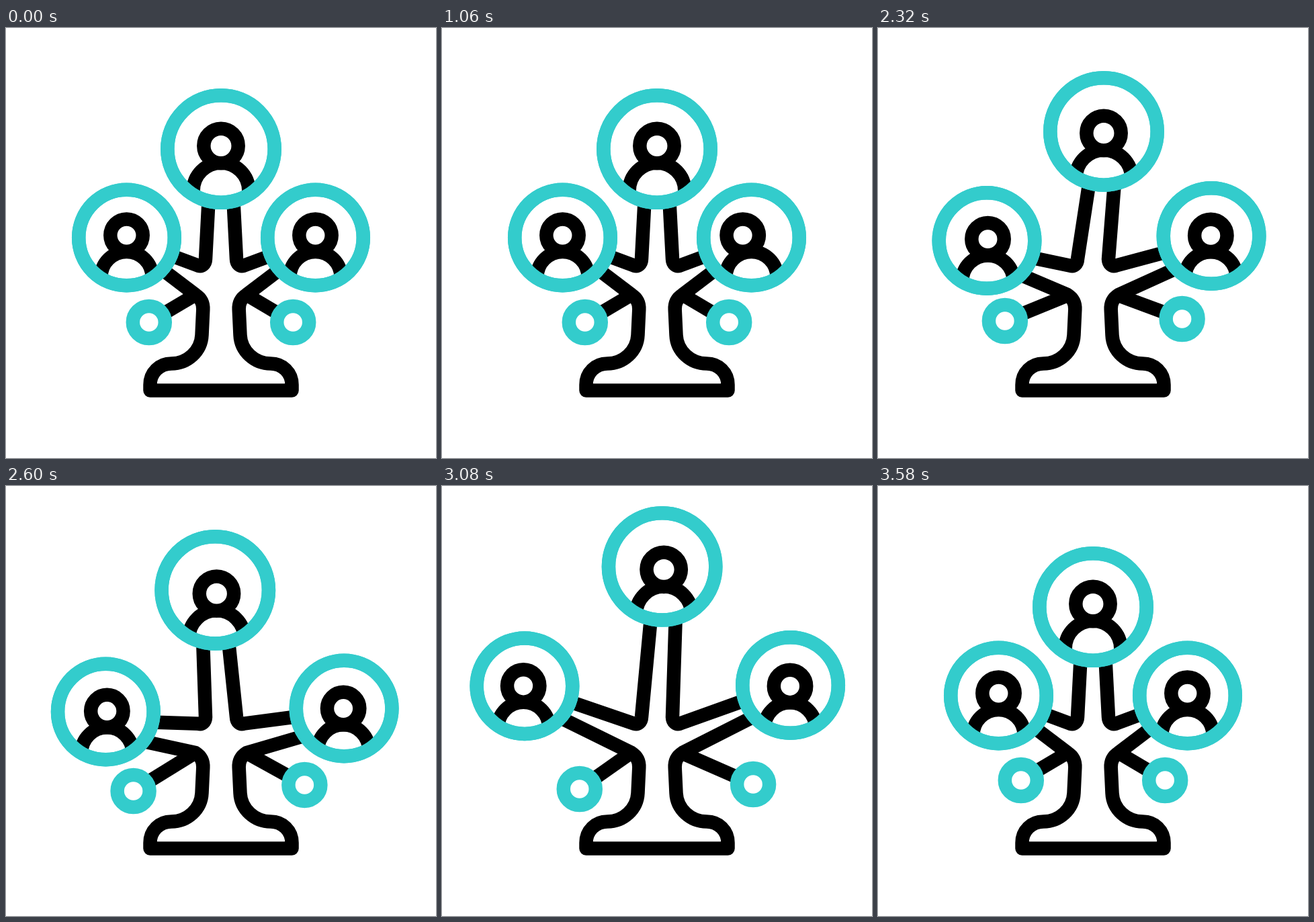
Recreate the animation shown at these times as an HTML page with a canvas. Size 640 px wide and 640 px high, loop 3.6 s.

```html
<!DOCTYPE html>
<html lang="en">
<head>
<meta charset="utf-8">
<title>People tree</title>
<style>
  html, body { margin: 0; width: 100%; height: 100%; overflow: hidden; background: #fff; }
  canvas { display: block; width: 100vw; height: 100vh; }
</style>
</head>
<body>
<canvas width="640" height="640"></canvas>
<script>
const ctx = document.querySelector('canvas').getContext('2d');
const LOOP = 3600, TEAL = '#33cccc', BLACK = '#000', STROKE = 20.5;
const SWAY_START = 1980, SWAY_STEP = 400, NOD_STEP = 660;

// Each track holds four poses: rest, first sway, second sway, third sway.
const top_ = {
  radius: 79.7, headRadius: 25.7, bustRadius: 41.3, bustDrop: 66.5,
  ring: [[320, 180], [337, 152.3], [292.5, 156.8], [334, 113.2]],
  head: [[320, 175.5], [337, 155.3], [296.3, 163.7], [336.3, 117.2]],
  nod: [20, 0]
};
const right = {
  radius: 71.3, headRadius: 24.2, bustRadius: 38.1, bustDrop: 62.4,
  ring: [[460.5, 312], [498.3, 309.3], [506.6, 346.9], [520.7, 287.4]],
  head: [[460.5, 308.6], [497.5, 308.9], [505.5, 347.2], [520.3, 289]],
  nod: [-13, 0]
};
const left = {
  radius: 71.3, headRadius: 24.2, bustRadius: 38.1, bustDrop: 62.4,
  ring: [[179.5, 312], [160.9, 316.8], [139.2, 350], [120, 288.2]],
  head: [[179.5, 308.6], [162.5, 314.5], [141.5, 350], [117.5, 287.9]],
  nod: [0, -7]
};
const people = [top_, right, left];
const buds = [
  { from: [277, 400], ring: [[212.8, 438], [187.4, 435.9], [191.2, 467.3], [207.2, 448]] },
  { from: [363, 400], ring: [[427.2, 438], [454.2, 432.7], [437.2, 453.8], [467.8, 442.2]] }
];
// Where the branches meet the rings, relative to the ring centres.
const joints = {
  topLeft: [-18.6, -22.4, -14.8, -17.5],
  topRight: [18.6, 15.5, 23.8, 19.3],
  leftUpper: [24.4, 23.8, 8.9, 22.9],
  leftLower: [45.2, 51.1, 36.7, 47.3],
  rightUpper: [24.4, 22.1, 2.8, 22.8],
  rightLower: [45.2, 47.7, 31.3, 46.6]
};

const ease = u => { u = Math.min(1, Math.max(0, u)); return u * u * (3 - 2 * u); };
const mix = (a, b, u) => a + (b - a) * u;

function sway(track, t) {
  const phase = Math.min(3.9999, Math.max(0, (t - SWAY_START) / SWAY_STEP));
  const i = Math.floor(phase), u = ease(phase - i);
  const a = track[i], b = track[(i + 1) % 4];
  return Array.isArray(a) ? a.map((v, k) => mix(v, b[k], u)) : mix(a, b, u);
}

const nodAmount = t => ease(t / 220) - ease((t - 380) / 280);

function stroke(color) {
  ctx.strokeStyle = color;
  ctx.stroke();
}

function circle([x, y], r, color) {
  ctx.beginPath();
  ctx.arc(x, y, r, 0, 2 * Math.PI);
  ctx.fillStyle = '#fff';
  ctx.fill();
  stroke(color);
}

// One half of the tree; the right half is drawn mirrored about x = 320.
function crown(side, topEnd, upperEnd, lowerEnd) {
  const m = x => side < 0 ? x : 640 - x;
  ctx.beginPath();
  ctx.moveTo(...topEnd);
  ctx.lineTo(m(297), 344);
  ctx.bezierCurveTo(m(296.7), 351, m(292), 355.7, m(286), 353.7);
  ctx.lineTo(...upperEnd);
  ctx.moveTo(...lowerEnd);
  ctx.lineTo(m(282), 397);
  ctx.bezierCurveTo(m(289), 401.5, m(293.8), 409, m(293.3), 419);
  ctx.lineTo(m(291.5), 457);
  ctx.bezierCurveTo(m(290.4), 481, m(270), 499.5, m(246), 499.5);
  ctx.bezierCurveTo(m(228.5), 499.5, m(214.5), 513, m(214.5), 531);
  ctx.lineTo(m(214.5), 539.5);
  ctx.lineTo(320, 539.5);
  stroke(BLACK);
}

function drawPerson(person, index, t) {
  const ring = sway(person.ring, t), [x, y] = sway(person.head, t);
  const nod = nodAmount(t - index * NOD_STEP);
  const bustY = y + person.bustDrop, r = person.bustRadius;

  circle(ring, person.radius, TEAL);
  ctx.save();
  ctx.beginPath();
  ctx.arc(...ring, person.radius, 0, 2 * Math.PI);
  ctx.clip();
  ctx.beginPath();
  ctx.moveTo(x - r, bustY + 40);
  ctx.arc(x, bustY, r, Math.PI, 0);
  ctx.lineTo(x + r, bustY + 40);
  stroke(BLACK);
  circle([x + person.nod[0] * nod, y + person.nod[1] * nod], person.headRadius, BLACK);
  ctx.restore();

  ctx.beginPath();
  ctx.arc(...ring, person.radius, 0, 2 * Math.PI);
  stroke(TEAL);
}

function draw(t) {
  ctx.fillStyle = '#fff';
  ctx.fillRect(0, 0, 640, 640);
  ctx.lineWidth = STROKE;
  ctx.lineJoin = 'round';

  const end = (person, dx, dy) => {
    const [x, y] = sway(person.ring, t);
    return [x + dx, y + dy];
  };
  const joint = name => sway(joints[name], t);

  for (const bud of buds) {
    ctx.beginPath();
    ctx.moveTo(...bud.from);
    ctx.lineTo(...sway(bud.ring, t));
    stroke(BLACK);
  }
  crown(-1, end(top_, joint('topLeft'), 80),
    end(left, 60, joint('leftUpper')), end(left, 50, joint('leftLower')));
  crown(1, end(top_, joint('topRight'), 80),
    end(right, -60, joint('rightUpper')), end(right, -50, joint('rightLower')));
  for (const bud of buds) circle(sway(bud.ring, t), 24, TEAL);
  people.forEach((person, i) => drawPerson(person, i, t));
}

const start = performance.now();
function tick() {
  draw((performance.now() - start) % LOOP);
  requestAnimationFrame(tick);
}
tick();
</script>
</body>
</html>
```
